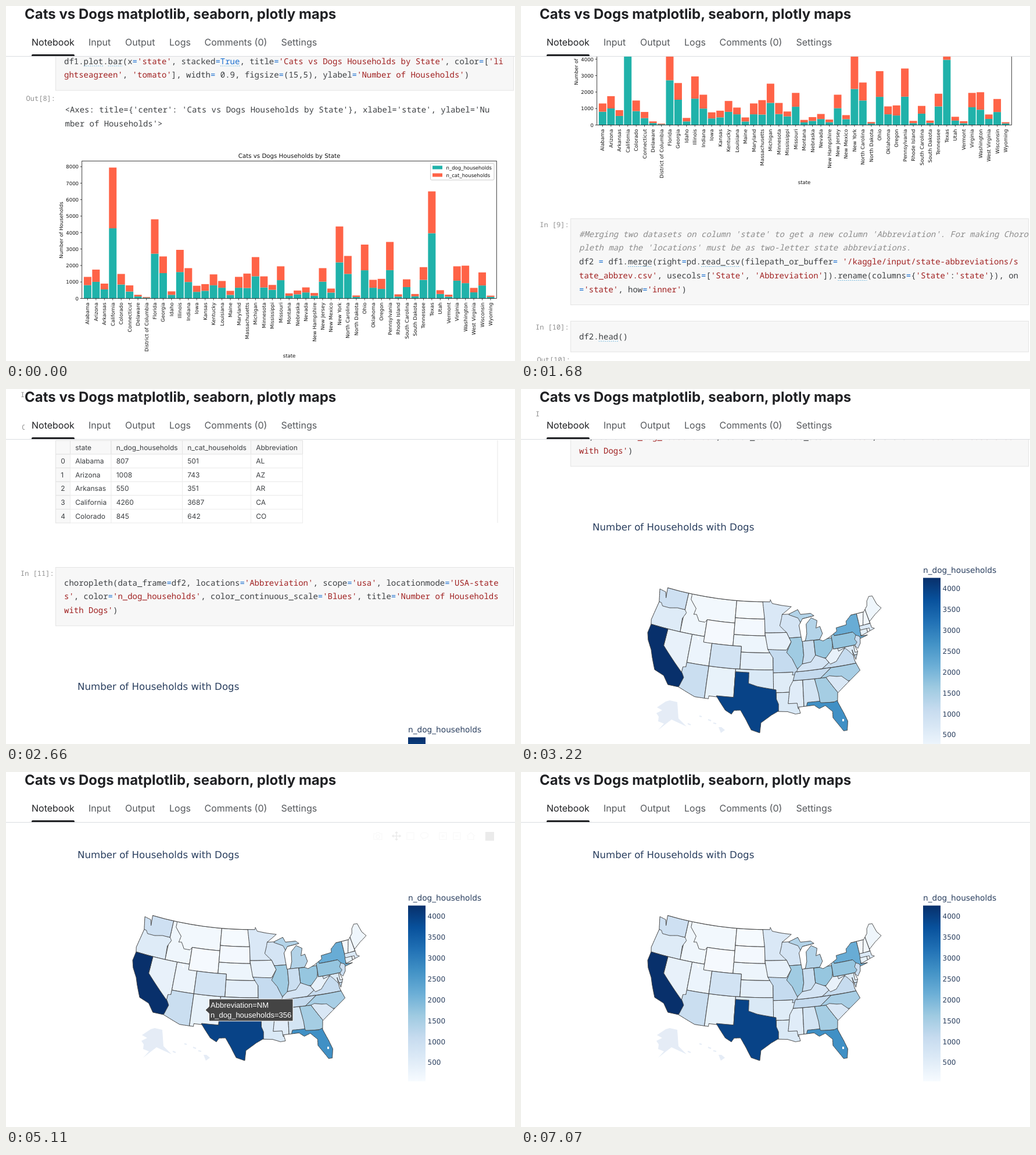
These frames come from a looping animation (876 by 610 pixels, 7.21 s). An HTML page:

```html
<!DOCTYPE html>
<html lang="en">
<head>
<meta charset="utf-8">
<title>Cats vs Dogs maps</title>
<style>
  html, body { margin: 0; width: 100%; height: 100%; overflow: hidden; background: #fff; }
  svg { display: block; width: 876px; height: 610px; text-rendering: geometricPrecision; }
  text { white-space: pre; }
  .title { font: 700 24px Inter, sans-serif; fill: #202124; }
  .tab { font: 16px Inter, sans-serif; fill: #55585c; }
  .tab.on { fill: #202124; }
  .cell { fill: #f7f7f7; stroke: #e4e4e4; }
  .code { font: 14px "Noto Sans Mono", monospace; fill: #3c3f42; }
  .string { fill: #a02020; }
  .op { fill: #1a6fd0; }
  .note { fill: #8c8c8c; font-style: italic; }
  .hint { stroke: #76bbe0; stroke-dasharray: 2 1.5; }
  .prompt { font: 12px "Noto Sans Mono", monospace; fill: #8f8f8f; text-anchor: end; }
  .grid { font: 12px Inter, sans-serif; fill: #3c3f42; }
  .plot { font: 8.53px "DejaVu Sans", sans-serif; fill: #111; }
  .plotTitle { font-size: 10.24px; }
  .axis { stroke: #111; stroke-width: .8; fill: none; }
  .mid { text-anchor: middle; }
  .end { text-anchor: end; }
  .map { font: 12px "DejaVu Sans", sans-serif; fill: #2a3f5f; }
  .mapTitle { font-size: 16.65px; }
  .barTitle { font-size: 13.7px; }
  .state { stroke: #444; stroke-linejoin: round; }
  .land { fill: #e5ecf6; }
  .tip { font: 13px "Liberation Sans", Arial, sans-serif; fill: #fff; }
  .icon { fill: none; stroke: #444; stroke-width: 1.5; opacity: .2; }
  .icon.on { opacity: .7; }
</style>
</head>
<body>
<svg id="stage" viewBox="0 0 876 610"></svg>
<script>
function add(parent, tag, attrs = {}, content) {
  const node = document.createElementNS('http://www.w3.org/2000/svg', tag);
  for (const key in attrs) node.setAttribute(key, attrs[key]);
  if (content !== undefined) node.textContent = content;
  return parent.appendChild(node);
}
const text = (parent, x, y, content, cls = '', more) => add(parent, 'text', { x, y, class: cls, ...more }, content);
const rect = (parent, x, y, width, height, more) => add(parent, 'rect', { x, y, width, height, ...more });
const path = (parent, d, more) => add(parent, 'path', { d, ...more });

const stage = document.getElementById('stage');
const page = add(stage, 'g');

// Code cells
const TOKEN = /(#[^]*?\.\n)|('[^']*')|(=|True\b)|\w+|[^\w'=]+/g;
const HINTED = /^(plot|bar|merge|read_csv|rename|head|True)$/;
const CHAR = 8.4, LINE = 23.8;

function codeCell(top, number, source) {
  rect(page, 85.5, top, 788, 29 + source.split('\n').length * LINE, { class: 'cell' });
  text(page, 82.6, top + 14, `In [${number}]:`, 'prompt');
  let row = 0, col = 0;
  for (const [token, note, string, op] of source.matchAll(TOKEN)) {
    const kind = note ? ' note' : string ? ' string' : op ? ' op' : '';
    token.split('\n').forEach((part, i) => {
      if (i) { row++; col = 0; }
      const y = top + 31 + row * LINE;
      for (const word of part.matchAll(/\S+/g)) {
        const x = 100 + (col + word.index) * CHAR;
        text(page, x, y, word[0], 'code' + kind);
        if (HINTED.test(part)) path(page, `M${x} ${y + 3.5}h${part.length * CHAR}`, { class: 'hint' });
      }
      col += part.length;
    });
  }
}

codeCell(68.5, 8, `df1.plot.bar(x='state', stacked=True, title='Cats vs Dogs Households by State', color=['li
ghtseagreen', 'tomato'], width= 0.9, figsize=(15,5), ylabel='Number of Households')`);
codeCell(663.5, 9, `#Merging two datasets on column 'state' to get a new column 'Abbreviation'. For making Choro
pleth map the 'locations' must be as two-letter state abbreviations.
df2 = df1.merge(right=pd.read_csv(filepath_or_buffer= '/kaggle/input/state-abbreviations/s
tate_abbrev.csv', usecols=['State', 'Abbreviation']).rename(columns={'State':'state'}), on
='state', how='inner')`);
codeCell(839.5, 10, 'df2.head()');
codeCell(1146.5, 11, `choropleth(data_frame=df2, locations='Abbreviation', scope='usa', locationmode='USA-state
s', color='n_dog_households', color_continuous_scale='Blues', title='Number of Households
with Dogs')`);

text(page, 85, 163, 'Out[8]:', 'prompt');
text(page, 85, 910, 'Out[10]:', 'prompt');
text(page, 101.5, 183, "<Axes: title={'center': 'Cats vs Dogs Households by State'}, xlabel='state', ylabel='Nu", 'code');
text(page, 101.5, 206.5, "mber of Households'>", 'code');

// Albers equal-area projection; longitudes are degrees west
const RAD = Math.PI / 180, SIN1 = Math.sin(29.5 * RAD), SIN2 = Math.sin(45.5 * RAD);
const CONE = (SIN1 + SIN2) / 2, CURVE = 1 + SIN1 * SIN2;

function project(west, north) {
  const radius = 557 * Math.sqrt(CURVE - 2 * CONE * Math.sin(north * RAD)) / CONE;
  const angle = CONE * (96 - west) * RAD;
  return [423.3 + radius * Math.sin(angle), radius * Math.cos(angle) - 343];
}

// "lon lat, lon lat, ..." becomes a closed path; two corners stand for a box
function region(corners) {
  let points = corners.split(',').map(pair => pair.trim().split(' ').map(Number));
  if (points.length === 2) {
    const [[w, n], [e, s]] = points;
    points = [[w, n], [e, n], [e, s], [w, s]];
  }
  const steps = 8, line = [];
  points.forEach(([lon, lat], i) => {
    const [nextLon, nextLat] = points[(i + 1) % points.length];
    for (let k = 0; k < steps; k++)
      line.push(project(lon + (nextLon - lon) * k / steps, lat + (nextLat - lat) * k / steps).map(v => v.toFixed(1)));
  });
  return `M${line.join(' ')}Z`;
}

const BLUES = ['#f7fbff', '#deebf7', '#c6dbef', '#9ecae1', '#6baed6', '#4292c6', '#2171b5', '#08519c', '#08306b'];
const LOW = 45, HIGH = 4260;
function blue(value) {
  const pos = (value - LOW) / (HIGH - LOW) * 8, i = Math.min(7, Math.floor(pos));
  return `color-mix(in srgb, ${BLUES[i + 1]} ${(pos - i) * 100}%, ${BLUES[i]})`;
}

const map = add(page, 'g', { class: 'map', transform: 'translate(0 1209)' });
const north = '124.7 48.4, 123 48.2, 122.5 47.2, 122.8 49, 95.2 49, 95.1 49.4, 94.6 48.7, 92 48.3, 89.6 48, 92.1 46.7, 90.4 46.7, 88 47.4, 87.4 46.5, 84.8 46.5, 84 46, 87 45.7, 88 44.6, 87.8 43, 87.6 41.7, 86.8 41.8, 86.3 43, 86.2 44.7, 84.8 45.7, 83.4 45.1, 83.9 43.8, 82.9 44, 82.5 42.7, 83.4 41.7, 82.6 41.4, 81.2 41.8, 79 42.7, 79 43.3, 76.4 43.5, 76.3 44.1, 74.8 45, 71.5 45, 70.3 45.9, 70 46.7, 69.2 47.4, 68.3 47.3, 67.8 45.7, 67 44.8';
const atlantic = '69 44, 70.7 43.1, 70.6 42, 70 41.7, 71.2 41.5, 73.6 41, 72 40.9, 73.9 40.6, 74.1 39.8, 74.9 39, 75.5 39.6, 75.1 38.5, 75.9 37.2, 76.3 39, 76.2 37, 75.5 35.2, 77.9 33.9, 79.3 33.1, 81.1 32, 81.4 30.5, 80.5 28.3, 80 26.8, 80.4 25.2';
const gulf = '81.1 25.2, 81.8 26.3, 82.8 27.8, 82.7 28.9, 84 30.1, 85.3 29.7, 86.3 30.4, 89.5 30.3, 89.2 29.2, 90.2 29.1, 91.8 29.6, 93.8 29.7, 95.2 29, 97.2 27.7, 97.4 25.9, 99.1 26.4, 100.3 28.3, 101.4 29.8, 102.7 29.7, 103.2 29, 104.5 29.6, 106.5 31.8, 108.2 31.8, 108.2 31.3, 111.1 31.3, 114.8 32.5';
const pacific = '117.1 32.5, 118.4 33.9, 120.6 34.5, 121.9 36.6, 122.5 37.7, 123.8 39.2, 124.4 40.4, 124.2 42, 124.5 42.8, 123.9 46.2';
const coast = region([north, atlantic, gulf, pacific].join());
path(add(map, 'clipPath', { id: 'coast' }), coast);
const inland = add(map, 'g', { 'clip-path': 'url(#coast)' });

// Drawn back to front: rough areas are trimmed by the coast and by later neighbours
const states = [];
function state(abbr, name, dogs, cats, corners) {
  states.push({ abbr, name, dogs, cats });
  if (corners) path(inland, region(corners), { class: 'state', style: `fill:${blue(dogs)}` });
}

state('ID', 'Idaho', 220, 210, '117.03 49, 111.05 42');
state('OR', 'Oregon', 580, 610, '125 46.3, 117 46, 116.5 45.5, 117.2 44.4, 117 42, 125 42');
state('WA', 'Washington', 930, 1060, '125 49, 117.03 49, 117.03 46, 119 46, 121 45.65, 122.8 45.65, 123.3 46.15, 125 46.3');
state('NV', 'Nevada', 365, 305, '120 42, 114.04 35');
state('UT', 'Utah', 270, 230, '114.04 42, 109.05 37');
state('AZ', 'Arizona', 1008, 743, '114.05 37, 109.05 37, 109.05 31, 115 31, 114.7 36.1, 114.05 36.2');
state('CA', 'California', 4260, 3687, '125 42, 120 42, 120 39, 114.6 35, 114.1 34.3, 114.7 32.7, 115 32, 125 32');
state('MT', 'Montana', 160, 150, '116.05 49, 104.05 49, 104.05 45, 111.05 45, 111.5 44.5, 113 44.5, 113.9 45.6, 114.6 45.5, 114.3 46.6, 116.05 48');
state('WY', 'Wyoming', 95, 75, '111.05 45, 104.05 41');
state('NM', 'New Mexico', 356, 244, '109.05 37, 103 31');
state('NE', 'Nebraska', 250, 230, '104.05 43, 96.4 43, 95.3 40, 102.05 40, 102.05 41, 104.05 41');
state('CO', 'Colorado', 845, 642, '109.05 41, 102.05 37');
state('ND', 'North Dakota', 90, 90, '104.05 49, 96.6 45.94');
state('SD', 'South Dakota', 130, 140, '104.05 45.94, 96.45 43');
state('KS', 'Kansas', 465, 405, '102.05 40, 94.6 37');
state('OK', 'Oklahoma', 650, 480, '103 37, 94.45 33');
state('MN', 'Minnesota', 665, 675, '97.2 49.5, 89 49.5, 89 43.5, 96.45 43.5, 96.6 46');
state('WI', 'Wisconsin', 790, 790, '92.1 46.7, 90 47.1, 87 46, 87 42.5, 90.6 42.5, 91.2 43.5, 92.8 44.7, 92.3 46');
state('MI', 'Michigan', 1345, 1165, '87 45.7, 84 46, 83 47, 88 48, 90.4 46.6, 88.1 45.9, 87.6 45.1, 87 41.74, 82 41.74, 82 45.7');
state('AR', 'Arkansas', 550, 351, '94.6 36.5, 89.7 33');
state('MO', 'Missouri', 1110, 840, '95.8 40.6, 91 40.6, 89 37, 89.7 36, 90.4 36, 90.2 36.5, 94.6 36.5, 94.6 39.1');
state('IA', 'Iowa', 400, 370, '96.5 43.5, 91.2 43.5, 90.2 41.8, 91.4 40.4, 95.8 40.6');
state('LA', 'Louisiana', 650, 410, '94.05 33, 88.8 28.8');
state('TX', 'Texas', 3960, 2540, '103 36.5, 100 36.5, 100 34.6, 98.1 34.1, 94.05 33.5, 94.05 31.9, 93.6 31, 93.8 25, 107 25, 106.6 32, 103 32');
state('MS', 'Mississippi', 525, 295, '90.3 35, 88.2 35, 88.4 30, 89.6 30, 89.75 31, 91.6 31, 91.1 33.9');
state('AL', 'Alabama', 807, 501, '88.2 35, 85.6 35, 85 32.3, 85 30, 88.4 30');
state('GA', 'Georgia', 1537, 1013, '85.6 35, 83.1 35, 81 32, 81 30.5, 85 30.6, 85.1 32.3');
state('FL', 'Florida', 2718, 2087, '87.6 31, 85 31, 84.9 30.7, 82.2 30.5, 81 30.8, 79 25, 84 25, 88 30');
state('IL', 'Illinois', 1602, 1348, '90.6 42.5, 87.5 42.5, 87.5 39.3, 88 37.7, 89.2 37, 90.2 38.8, 91.4 40, 90.2 41.8');
state('IN', 'Indiana', 1000, 840, '87.5 41.75, 84.8 41.75, 84.8 38, 88 37.8, 87.5 39.3');
state('OH', 'Ohio', 1710, 1560, '84.8 41.7, 80.5 38.4');
state('MD', 'Maryland', 650, 660, '79.5 39.72, 75 38');
state('VA', 'Virginia', 1080, 870, '83.7 36.6, 75 36.55, 75 38, 76.3 38, 77.2 39, 77.8 39.5, 82 37.5');
state('TN', 'Tennessee', 1130, 770, '89.7 36.5, 81.7 36.6, 84.3 35, 90.3 35');
state('KY', 'Kentucky', 800, 660, '89.4 36.5, 83.7 36.6, 82 37.5, 82.6 38.3, 84.8 39.1, 86 38, 88 37.8, 89.1 37');
state('NC', 'North Carolina', 1490, 1090, '84.3 35, 81.7 36.55, 75 36.55, 75 33.8, 78.6 33.8, 83 35');
state('SC', 'South Carolina', 690, 470, '83.1 35, 82.3 35.2, 80.8 34.9, 79.7 34.8, 78 33.4, 81 32');
state('WV', 'West Virginia', 370, 270, '82.6 38.3, 80.8 39.7, 80.5 40.6, 80.5 39.72, 79.5 39.72, 79.4 39.2, 77.8 39.6, 79.3 38.4, 80.3 37.5, 81.7 37.2');
state('DE', 'Delaware', 120, 100, '75.75 39.8, 74.9 38.45');
state('NY', 'New York', 2190, 2180, '80 42, 80 43.7, 76 45, 73.35 45, 73.3 42, 73.6 41.05, 71.8 41, 73.9 40.4, 75.3 42');
state('PA', 'Pennsylvania', 1720, 1710, '80.5 42.3, 79.8 42.3, 79.8 42, 75.3 42, 74.7 41.4, 74.8 39.72, 80.5 39.72');
state('NJ', 'New Jersey', 1020, 820, '74.7 41.35, 73.9 41, 73.5 39, 75 38.8, 75.5 39.6, 74.8 40.1, 75.2 40.7');
state('VT', 'Vermont', 110, 120, '73.35 45, 71.5 42.7');
state('NH', 'New Hampshire', 170, 160, '71.5 45.3, 71 45.3, 70.7 42.8, 72.5 42.7');
state('ME', 'Maine', 215, 245, '71 45.3, 71 48, 66 48, 66 43, 70.7 43');
state('MA', 'Massachusetts', 635, 875, '73.4 42.75, 69.8 41.4');
state('CT', 'Connecticut', 420, 372, '73.5 42.03, 71.8 41');
state('RI', 'Rhode Island', 115, 135, '71.8 42, 71.2 41.3');
state('DC', 'District of Columbia', 45, 40);
path(map, coast, { class: 'state', fill: 'none' });

// Islands, lakes, titles and colour bar
path(map, 'M249 442l7-2 13 3 2 28 14 14-26-12-23 18 10-11-10-4 1-8-4-6 10-5-9-5ZM340 486l5 0 6 5-7 5Z', { class: 'land' });
path(map, 'M287 480l5 2M307 467l4 1M322 473l5 2M331 479l5 1', { stroke: '#e5ecf6', 'stroke-width': 2 });
path(map, 'M303 330l4 4-2 3ZM553 472h3v4h-3Z', { fill: '#fff' });
text(map, 123, 147.5, 'Number of Households with Dogs', 'mapTitle');
text(map, 692, 221, 'n_dog_households', 'barTitle');
const ramp = add(map, 'linearGradient', { id: 'blues', x1: 0, y1: 1, x2: 0, y2: 0 });
BLUES.forEach((color, i) => add(ramp, 'stop', { offset: i / 8, 'stop-color': color }));
rect(map, 692, 229.5, 30, 302, { fill: 'url(#blues)' });
for (let v = 500; v <= 4000; v += 500) text(map, 725.5, 539.2 - v * .0717, v);

// Stacked bar chart
const chart = add(page, 'g', { class: 'plot' });
const BASE = 502.5, UNIT = .0283, COLORS = { dog: '#20b2aa', cat: '#ff6347' };
states.sort((a, b) => a.name < b.name ? -1 : 1);
states.forEach(({ name, dogs, cats }, i) => {
  const x = 140.4 + 14.45 * i;
  rect(chart, x - 6.5, BASE - dogs * UNIT, 13, dogs * UNIT, { fill: COLORS.dog });
  rect(chart, x - 6.5, BASE - (dogs + cats) * UNIT, 13, cats * UNIT, { fill: COLORS.cat });
  path(chart, `M${x} ${BASE}v3`, { class: 'axis' });
  text(chart, 0, 0, name, 'end', { transform: `translate(${x + 3} 509.5) rotate(-90)` });
});
rect(chart, 130.7, 266.3, 713.6, 236.2, { class: 'axis' });
for (let v = 0; v <= 8000; v += 1000) {
  const y = BASE - v * UNIT;
  path(chart, `M130.7 ${y}h-3`, { class: 'axis' });
  text(chart, 125, y + 3.2, v, 'end');
}
text(chart, 487.5, 261, 'Cats vs Dogs Households by State', 'mid plotTitle');
text(chart, 487.5, 603.5, 'state', 'mid');
text(chart, 0, 0, 'Number of Households', 'mid', { transform: 'translate(98 385) rotate(-90)' });
rect(chart, 730.5, 270.5, 109.5, 28.5, { rx: 2, fill: '#fff', stroke: '#ccc', 'fill-opacity': .8 });
Object.entries(COLORS).forEach(([pet, fill], i) => {
  rect(chart, 734, 274.5 + i * 13, 17, 6, { fill });
  text(chart, 757.5, 280.8 + i * 13, `n_${pet}_households`);
});

// Table of the first rows
const table = add(page, 'g', { transform: 'translate(0 928)' });
const edges = [85.5, 110.5, 181, 303.5, 421.5, 510.5];
const records = states.slice(0, 5).map(({ name, dogs, cats, abbr }, i) => [i, name, dogs, cats, abbr]);
records.unshift(['', 'state', 'n_dog_households', 'n_cat_households', 'Abbreviation']);
records.forEach((record, r) => record.forEach((value, c) => {
  const y = r * 23.6 + .5;
  rect(table, edges[c], y, edges[c + 1] - edges[c], 23.6,
    { fill: r && c ? '#fff' : '#f8f8f8', stroke: r && c ? '#ececec' : '#e2e2e2' });
  text(table, edges[c] + 8.7, y + 16, value, 'grid');
}));
path(table, 'M846 0v142', { stroke: '#e6e6e6' });

// Plot toolbar
const toolbar = add(map, 'g');
const icon = (x, d, cls = 'icon') => path(toolbar, d, { class: cls, transform: `translate(${x} 110)` });
icon(640, 'M-7-4h4l1-2h4l1 2h4v10h-14ZM-3 1a3 3 0 1 0 6 0a3 3 0 1 0-6 0');
icon(672, 'M-7 0H7M0-7V7M-5-2l-2 2 2 2M5-2l2 2-2 2M-2-5l2-2 2 2M-2 5l2 2 2-2', 'icon on');
icon(696, 'M-6-6H6V6H-6Z');
icon(720, 'M-3 3C-10 0-6-6 0-6S10 0 3 3S-4 2-3 6');
icon(752, 'M-6-6H6V6H-6ZM-3 0H3M0-3V3');
icon(776, 'M-6-6H6V6H-6ZM-3 0H3');
icon(800, 'M-7 0L0-6 7 0M-5 0V6H5V0');
rect(toolbar, 825, 103, 15, 15, { fill: '#444', opacity: .7 });

// Hover label: time, state, anchor
const tip = add(map, 'g', { class: 'tip' });
const tipBox = path(tip, '', { fill: '#444', stroke: '#fff' });
const tipName = text(tip, 9, -4, ''), tipValue = text(tip, 9, 12.5, '');
const hovers = [[5110, 'NM', 106.1, 34.4], [5180, 'TX', 99.3, 31.5], [5390, 'KY', 85.3, 37.5],
  [5460, 'WV', 80.6, 38.7], [5810, 'IA', 93.5, 42], [5950, 'NE', 99.7, 41.5],
  [6300, 'TX', 99.3, 31.5], [6440]];

// Fixed page header
const header = add(stage, 'g');
rect(header, 32, 0, 844, 86, { fill: '#fff' });
path(header, 'M0 86.5H876', { stroke: '#dadce0' });
text(header, 32, 22, 'Cats vs Dogs matplotlib, seaborn, plotly maps', 'title');
Object.entries({ Notebook: 44, Input: 142, Output: 205, Logs: 281, 'Comments (0)': 341.5, Settings: 473.5 })
  .forEach(([name, x], i) => text(header, x, 67.8, name, i ? 'tab' : 'tab on'));
path(header, 'M44 86v-1q0-2 2-2h70q2 0 2 2v1Z', { fill: '#202124' });

// Three swipes that lose speed: start, duration, distance, decay
const TICK = 70, LOOP = 7210;
const swipes = [[700, 980, 298, 1.4], [1680, 980, 542, 2.35], [2660, 1120, 369, 1.96]];
const clamp = v => Math.max(0, Math.min(1, v));

function draw(time) {
  const t = Math.floor(time % LOOP / TICK) * TICK;
  const scroll = swipes.reduce((sum, [start, duration, distance, decay]) =>
    sum + distance * (1 - (1 - clamp((t - start) / duration)) ** decay), 0);
  page.setAttribute('transform', `translate(0 ${-Math.round(scroll)})`);
  toolbar.setAttribute('opacity', Math.min(clamp((t - 5050) / 400), clamp((6720 - t) / 280)));

  const [, abbr, west, north] = hovers.findLast(hover => hover[0] <= t) || [];
  tip.setAttribute('visibility', abbr ? 'visible' : 'hidden');
  if (!abbr) return;
  const value = states.find(s => s.abbr === abbr).dogs;
  const right = 129.3 + 7.23 * String(value).length;
  tip.setAttribute('transform', `translate(${project(west, north).map(Math.round)})`);
  tipBox.setAttribute('d', `M0 0L6.5-6V-19H${right}V19H6.5V6Z`);
  tipName.textContent = 'Abbreviation=' + abbr;
  tipValue.textContent = 'n_dog_households=' + value;
}

const begin = performance.now();
(function frame() {
  draw(performance.now() - begin);
  requestAnimationFrame(frame);
})();
</script>
</body>
</html>
```
